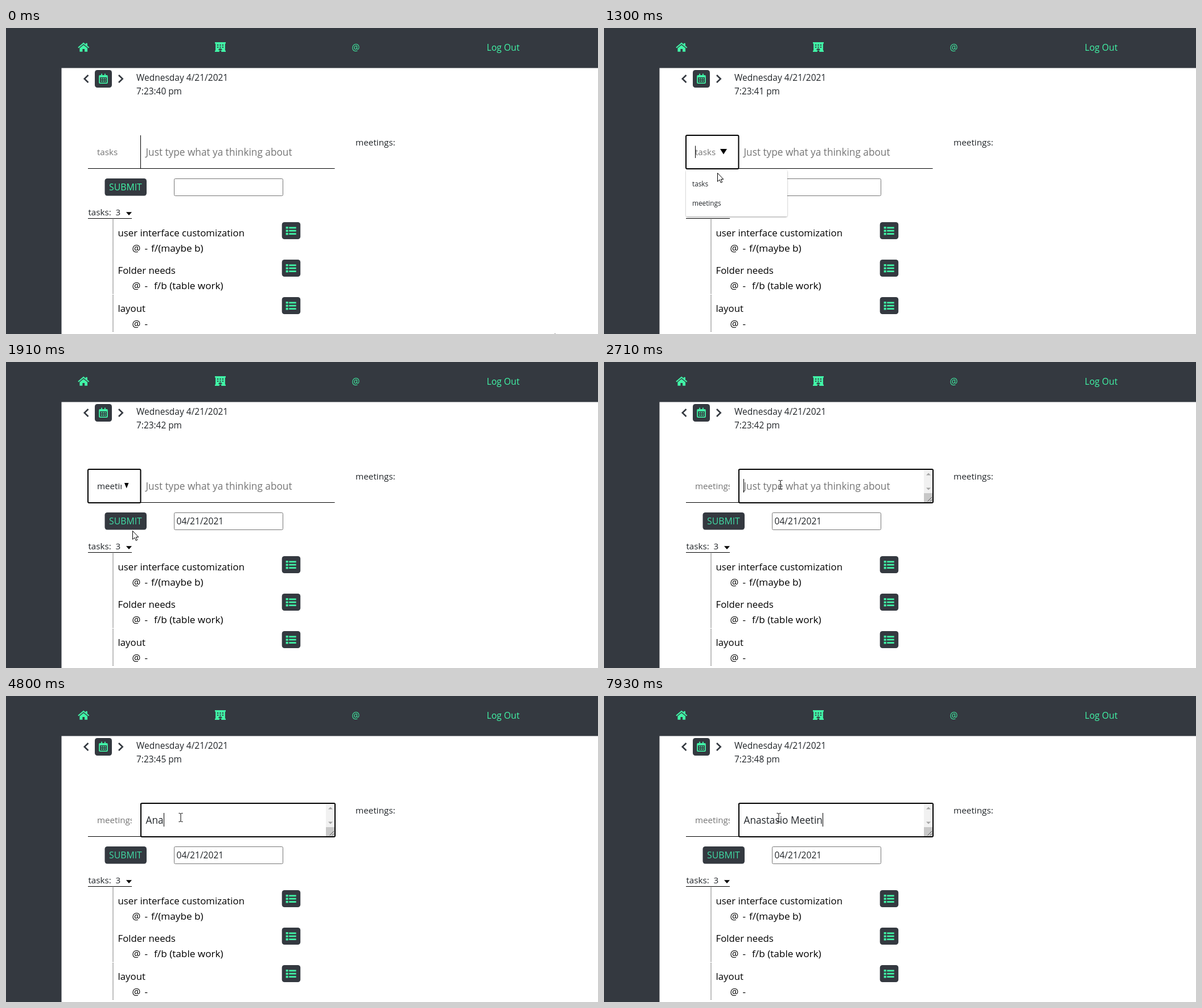
An HTML page for the animation above (8 s loop, 1040x539 px).

```html
<!DOCTYPE html>
<html lang="en">
<head>
<meta charset="utf-8">
<title>Planner</title>
<style>
  html, body { margin: 0; width: 100%; height: 100%; overflow: hidden; background: #fff; }
  svg { display: block; width: 1040px; height: 539px; }
  text { font: 15.5px "Open Sans", "Noto Sans", sans-serif; fill: #212529; white-space: pre; }
  .dark { fill: #343940; }
  .green, text.green { fill: #41f5a7; }
  .grey { fill: #757575; }
  .small { font-size: 15.15px; }
  .entry { font-size: 17.24px; }
  .title { font-size: 16.8px; fill: #000; }
  .sub { font-size: 17.2px; fill: #000; }
  .option { font-size: 11.8px; font-weight: 500; }
  .line { stroke: #000; fill: none; }
  .ring { stroke: #000; stroke-width: 2; fill: #fff; }
  .chevron { stroke: #343940; stroke-width: 2.6; fill: none; }
</style>
</head>
<body>
<svg viewBox="0 0 1040 539">
  <defs>
    <g id="list">
      <rect class="dark" width="32.5" height="30" rx="4.5"/>
      <path class="green" d="M7 8h4v3.6H7zM12.5 8.4H25v2.8H12.5zM7 13.4h4V17H7zM12.5 13.8H25v2.8H12.5zM7 18.8h4v3.6H7zM12.5 19.2H25V22H12.5z"/>
    </g>
    <clipPath id="wide"><rect x="158" y="200" width="63" height="40"/></clipPath>
    <clipPath id="narrow"><rect x="158" y="200" width="45" height="40"/></clipPath>
    <filter id="shadow" x="-10%" y="-10%" width="120%" height="125%">
      <feDropShadow dx="0" dy="1" stdDeviation="1.3" flood-opacity=".4"/>
    </filter>
  </defs>

  <path class="dark" d="M0 0H1040V70.5H97.5V539H0z"/>
  <g class="green">
    <path d="M136.2 25.5l3.8 3.2v-1.9h2.9v4.4l3.4 2.9-1.2 1.5-8.9-7.4-8.6 7.4-1.3-1.5z"/>
    <path d="M129.4 35.6l6.8-5.6 6.9 5.6v6.1h-5v-4.6h-3.7v4.6h-5z"/>
    <path fill-rule="evenodd" d="M367 25h19v2.4h-1.1v12.4h1.1v2.2h-7.8v-2.4h-3.4v2.4H367v-2.2h1.1V27.400H367z
      M371 29v2h2.2v-2zM375.400 29v2h2.200v-2zM379.800 29v2h2.200v-2zM371 32.800v2h2.200v-2zM375.400 32.800v2h2.200v-2zM379.800 32.800v2h2.200v-2zM373 38.800h7q-.8-2.800-3.500-2.800t-3.500 2.800z"/>
  </g>
  <text class="green" x="607.500" y="39.500">@</text>
  <text class="green" x="844.500" y="40" style="font-size:15.7px">Log Out</text>

  <path class="chevron" d="M144.500 83l-6.700 6.500 6.700 6.500M198 83l6.700 6.500-6.700 6.500"/>
  <rect class="dark" x="156" y="74" width="30" height="31" rx="4.500"/>
  <path class="green" fill-rule="evenodd" d="M165 83h2.200v-2.500h1.800V83h4v-2.500h1.800V83h2.200q1.800 0 1.800 1.800v11.400q0 1.800-1.800 1.800h-12q-1.800 0-1.800-1.800V84.800q0-1.800 1.800-1.800zM165 87v9.300h12V87z
    M166.700 88.500h2v2h-2zM170 88.500h2v2h-2zM173.300 88.500h2v2h-2zM166.700 92.500h2v2h-2zM170 92.500h2v2h-2zM173.300 92.500h2v2h-2z"/>
  <text x="229" y="93">Wednesday 4/21/2021</text>
  <text x="229" y="117" id="clock" style="font-size:15.4px"></text>
  <text x="614" y="207" style="font-size:15.3px">meetings:</text>

  <path class="line" d="M144 247.500H577.500M236.500 189V247"/>
  <rect class="dark" x="173.500" y="265" width="73.500" height="30.500" rx="4.500"/>
  <text class="green" id="submit" x="181" y="286" style="font-size:15.8px">SUBMIT</text>
  <rect x="295.500" y="265.500" width="191" height="30" rx="2" fill="#fff" stroke="#767676"/>
  <text id="date" x="299.500" y="286" style="font-size:15.6px">04/21/2021</text>

  <text class="small" x="144.500" y="330">tasks:</text>
  <text class="small" x="192.500" y="330">3</text>
  <path d="M211 324.300h10l-5 5.700z"/>
  <path class="line" d="M144 335.500H221"/>
  <path class="line" stroke-dasharray="1 1" d="M188 337V402M188 403V469M188 470V536"/>
  <text class="title" x="196.500" y="367">user interface customization</text>
  <text class="title" x="196.500" y="433">Folder needs</text>
  <text class="title" x="196.500" y="500">layout</text>
  <g id="details"></g>
  <text class="sub" x="255" y="394">f/(maybe b)</text>
  <text class="sub" x="260" y="460">f/b (table work)</text>
  <use href="#list" x="484.700" y="342"/>
  <use href="#list" x="484.700" y="408"/>
  <use href="#list" x="484.700" y="474"/>

  <rect id="kindRing" class="ring" x="144" y="189" width="92.500" height="59" rx="2"/>
  <text class="small" id="kind" x="160" y="224"></text>
  <path id="arrow"/>
  <path id="kindCaret" class="line" d="M160.500 207.500V229"/>

  <g id="entryRing">
    <rect class="ring" x="237" y="189" width="341" height="59" rx="2"/>
    <path fill="#f1f1f1" d="M562 190h15v41h-15z"/>
    <path fill="#c8c8c8" d="M562 231h15v16h-15z"/>
    <path fill="#a3a3a3" d="M566 199.500h8l-4-4zM566 221.500h8l-4 4z"/>
    <path stroke="#555" d="M568.500 245.500l7.500-7.500M573 245.500l3-3"/>
  </g>
  <text class="entry grey" id="hint" x="245.500" y="225" style="fill:#757575">Just type what ya thinking about</text>
  <text class="entry" id="typed" x="245.500" y="225"></text>
  <path id="caret" class="line" d="M.5 206V230"/>

  <g id="menu">
    <rect x="144" y="250" width="178" height="82" rx="3" fill="#fff" filter="url(#shadow)"/>
    <rect id="hover" x="144" width="178" height="33.500" fill="#efefef"/>
    <text class="option" x="155" y="279">tasks</text>
    <text class="option" x="155" y="312.500">meetings</text>
  </g>

  <path id="pointer" fill="#fff" stroke="#000" stroke-linejoin="round" d="M.5.500V15.500L4 12.300 6.300 17.500 8.700 16.500 6.400 11.400H10.800z"/>
  <path id="beam" class="line" d="M-3.500-7.500H-1.500L0-6.500 1.500-7.500H3.500M0-6.500V6.500M-3.500 7.500H-1.500L0 6.500 1.500 7.500H3.500"/>
</svg>
<script>
  const $ = id => document.getElementById(id);
  const show = (id, on) => { $(id).style.display = on ? '' : 'none'; };
  const move = (id, x, y) => $(id).setAttribute('transform', `translate(${x} ${y})`);
  const setText = (id, s) => { if ($(id).textContent !== s) $(id).textContent = s; };

  const LOOP = 8000, OPEN = 920, PICK = 1760, FOCUS = 2540;
  const PHRASE = 'Anastasio Meetin';
  const KEYS = [4180, 4500, 4720, 5360, 5530, 5600, 5770, 5840, 5920, 6700, 7000, 7230, 7700, 7770, 7850, 7930];
  const TICKS = [840, 1760, 2780, 3800, 4800, 5840, 6770, 7770];
  // time, x, y
  const PATH = [
    [0, 964, 538], [608, 217, 210], [836, 205, 215], [1064, 200, 236], [1216, 200, 236],
    [1292, 199, 255], [1596, 188, 303], [1748, 188, 303], [1900, 222, 297],
    [2204, 310, 216], [2660, 310, 216], [2690, 307, 214], [LOOP, 307, 214]
  ];

  $('details').innerHTML = [394, 460, 527].map(y =>
    `<text class="sub" x="221.500" y="${y}" style="font-size:16.500px">@</text><text class="sub" x="243.500" y="${y}">-</text>`).join('');

  const passed = (times, t) => times.filter(k => k <= t).length;

  function pointerAt(t) {
    const s = Math.floor(t / 76) * 76;
    const i = PATH.findIndex(p => p[0] > s);
    const [t0, x0, y0] = PATH[i - 1], [t1, x1, y1] = PATH[i];
    const u = (s - t0) / (t1 - t0), e = u * u * (3 - 2 * u);
    return [Math.round(x0 + (x1 - x0) * e), Math.round(y0 + (y1 - y0) * e)];
  }

  function draw(t) {
    const [x, y] = pointerAt(t);
    const inRow = y > 188 && y < 248;
    const overKind = inRow && x > 143 && x < 236;
    const overEntry = inRow && x > 236 && x < 578;
    const kindFocus = t >= OPEN && t < FOCUS, picked = t >= PICK, focused = t >= FOCUS;
    const menu = t >= OPEN && !picked;

    setText('clock', `7:23:${40 + passed(TICKS, t)} pm`);
    show('date', picked);
    $('submit').style.fill = picked ? '#40dca5' : '';

    show('kindRing', kindFocus);
    setText('kind', picked ? 'meetings' : 'tasks');
    $('kind').style.fill = picked && !focused ? '#212529' : '#757575';
    $('kind').setAttribute('clip-path', picked && !focused ? 'url(#narrow)' : 'url(#wide)');
    show('arrow', kindFocus || overKind);
    $('arrow').setAttribute('d', picked ? 'M208 213h7.500l-3.700 9.500z' : 'M204 213h12l-6 9.500z');
    show('kindCaret', menu && t < 1450);

    show('menu', menu);
    show('hover', y >= 258 && y < 325);
    $('hover').setAttribute('y', y < 291.5 ? 258 : 291.5);

    const n = passed(KEYS, t), last = n ? KEYS[n - 1] : FOCUS, idle = t - last;
    show('entryRing', focused);
    show('hint', !n);
    setText('typed', PHRASE.slice(0, n));
    show('caret', focused && (idle < 550 || idle >= 1090 && idle < 1560));
    move('caret', Math.round(245.5 + (n ? $('typed').getComputedTextLength() : -.5)), 0);

    show('pointer', !overEntry);
    show('beam', overEntry);
    move(overEntry ? 'beam' : 'pointer', x, y);
  }

  const start = performance.now();
  function frame() {
    draw((performance.now() - start) % LOOP);
    requestAnimationFrame(frame);
  }
  frame();
</script>
</body>
</html>
```
